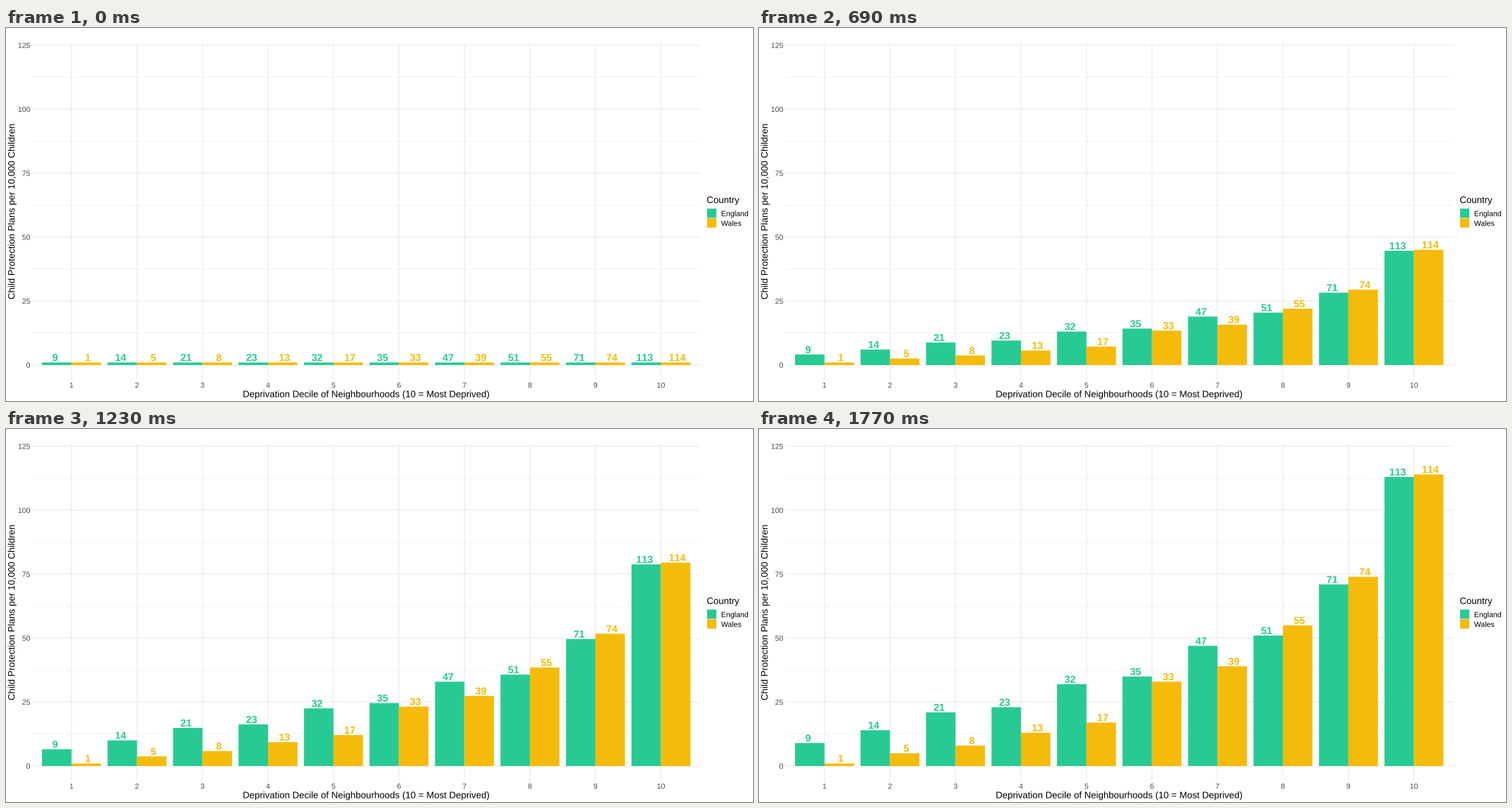
These frames come from a looping animation (1058x529 px, 1.8 s). A matplotlib script:

```python
import matplotlib.pyplot as plt
from matplotlib.animation import FuncAnimation
from matplotlib.patches import PathPatch, Rectangle
from matplotlib.path import Path
from matplotlib.textpath import TextPath
from matplotlib.transforms import Affine2D

W, H, DPI = 1058, 529, 64
FRAMES, INTERVAL = 60, 30
LEFT, RIGHT, TOP, BOTTOM = 37.1, 983.3, 20.9, 499.8
STEP = (RIGHT - LEFT) / 10.2
UNIT = (BOTTOM - TOP) / 132
ZERO = 478.0

GREEN, YELLOW = "#28CA94", "#F5BB0A"
GRID, TICK = "#EBEBEB", "#4D4D4D"
TITLE_SIZE, TICK_SIZE, LABEL_SIZE = 13.2, 10.56, 14.3
DIGIT = 0.556  # advance of one digit in em

ENGLAND = [9, 14, 21, 23, 32, 35, 47, 51, 71, 113]
WALES = [1, 5, 8, 13, 17, 33, 39, 55, 74, 114]

fig = plt.figure(figsize=(W / DPI, H / DPI), dpi=DPI, facecolor="white")
ax = fig.add_axes([0, 0, 1, 1])
ax.set_xlim(0, W)
ax.set_ylim(H, 0)
ax.axis("off")


def x_of(decile):
    return LEFT + STEP * (decile - 0.4)


def y_of(value):
    return ZERO - UNIT * value


def glyphs(text, size, weight="normal"):
    return TextPath((0, 0), text, size=size,
                    prop={"family": "Liberation Sans", "weight": weight})


def number(value, size, weight="normal"):
    """Outline of a number with evenly spaced digits, and its width."""
    parts = []
    for i, char in enumerate(str(value)):
        shape = glyphs(char, size, weight)
        parts.append(Path(shape.vertices + [i * DIGIT * size, 0], shape.codes))
    return Path.make_compound_path(*parts), len(parts) * DIGIT * size


def place(patch, x, y, angle=0):
    move = Affine2D().scale(1, -1).rotate_deg(-angle).translate(x, y)
    patch.set_transform(move + ax.transData)


def draw(path, x, y, color, angle=0, zorder=4):
    patch = PathPatch(path, facecolor=color, linewidth=0, zorder=zorder)
    ax.add_patch(patch)
    place(patch, x, y, angle)
    return patch


def centre(path):
    box = path.get_extents()
    return (box.x0 + box.x1) / 2


def box(x, y, w, h, color):
    patch = Rectangle((x, y), w, h, facecolor=color, linewidth=0,
                      snap=False, zorder=3)
    ax.add_patch(patch)
    return patch


def grid_line(xs, ys, width):
    ax.plot(xs, ys, color=GRID, linewidth=width * 72 / DPI, snap=False,
            solid_capstyle="butt", zorder=1)


def draw_axes():
    for k in range(5):
        y = y_of(12.5 + 25 * k)
        grid_line([LEFT, RIGHT], [y, y], 0.6)
    for value in range(0, 126, 25):
        y = y_of(value)
        grid_line([LEFT, RIGHT], [y, y], 1.15)
        path, width = number(value, TICK_SIZE)
        draw(path, LEFT - 2.64 - width, y + 3.8, TICK)
    for decile in range(1, 11):
        x = x_of(decile)
        grid_line([x, x], [TOP, BOTTOM], 1.15)
        path, width = number(decile, TICK_SIZE)
        draw(path, x - width / 2, 510.2, TICK)

    title = glyphs("Deprivation Decile of Neighbourhoods (10 = Most Deprived)",
                   TITLE_SIZE)
    draw(title, (LEFT + RIGHT) / 2 - centre(title), 523.6, "black")
    title = glyphs("Child Protection Plans per 10,000 Children", TITLE_SIZE)
    draw(title, 12.2, (TOP + BOTTOM) / 2 + centre(title), "black", angle=90)


def draw_legend():
    draw(glyphs("Country", TITLE_SIZE), 992.4, 248.2, "black")
    for name, color, y in (("England", GREEN, 256.1), ("Wales", YELLOW, 269.9)):
        box(992.9, y, 13.2, 13.2, color)
        draw(glyphs(name, TICK_SIZE), 1012.8, y + 10.7, "black")


def make_bars():
    bars = []
    for values, color, side in ((ENGLAND, GREEN, -1), (WALES, YELLOW, 1)):
        for decile, value in enumerate(values, 1):
            x = x_of(decile)
            left = x - 0.45 * STEP if side < 0 else x
            bar = box(left, ZERO, 0.45 * STEP, 0, color)
            path, width = number(value, LABEL_SIZE, "bold")
            label_x = x + side * STEP / 4 - width / 2
            label = draw(path, label_x, ZERO, color)
            bars.append((value, bar, label, label_x))
    return bars


draw_axes()
draw_legend()
bars = make_bars()


def update(frame):
    t = frame / (FRAMES - 1)
    for value, bar, label, label_x in bars:
        top = y_of(1 + (value - 1) * t)
        bar.set_y(top)
        bar.set_height(ZERO - top)
        place(label, label_x, top - 2.1)
    return []


anim = FuncAnimation(fig, update, frames=FRAMES, init_func=lambda: update(0),
                     interval=INTERVAL, repeat=True, repeat_delay=0)
plt.show()
```
